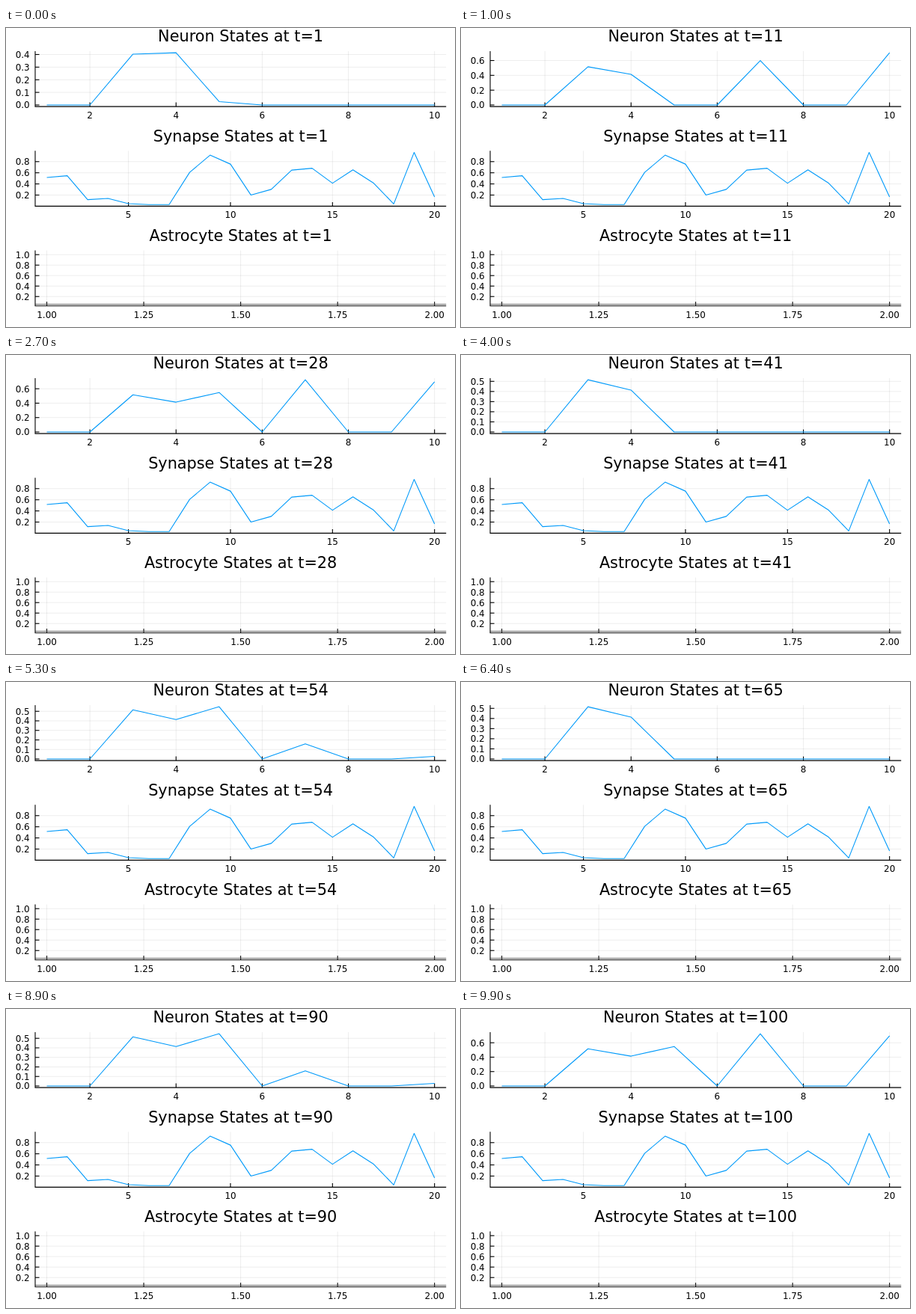
An HTML page that plays this animation: 600x400 px, repeating every 10 s.

```html
<!DOCTYPE html>
<html lang="en">
<head>
<meta charset="utf-8">
<title>Network states</title>
<style>
  html, body { margin: 0; width: 600px; height: 400px; overflow: hidden; background: #fff; }
  svg { display: block; }
  text { font-family: "DejaVu Sans", sans-serif; font-size: 11.9px; fill: #000; }
  .title { font-size: 20.8px; text-anchor: middle; }
  .x { text-anchor: middle; }
  .y { text-anchor: end; }
  .grid { stroke: #000; stroke-opacity: .1; stroke-width: .7; }
  .axis { stroke: #000; stroke-width: 1.1; fill: none; }
  .curve { stroke: #009afa; stroke-width: 1.1; fill: none; stroke-linejoin: round; }
  .level { stroke: #555; stroke-width: .9; }
</style>
</head>
<body>
<svg id="stage" width="600" height="400" viewBox="0 0 600 400"></svg>
<script>
const LEFT = 39, RIGHT = 588.2, HEIGHT = 74.1, PAD = 0.03 / 1.06;
const STEP_MS = 100, STEPS = 100;

const first = [0, 0, .403, .414, .027, 0, 0, 0, 0, 0];
// The network settles into a cycle of four steps.
const cycle = [
  [0, 0, .516, .414, .548, 0, .725, 0, 0, .697],
  [0, 0, .516, .414, 0, 0, 0, 0, 0, 0],
  [0, 0, .516, .414, .548, 0, .159, 0, 0, .028],
  [0, 0, .516, .414, 0, 0, .6, 0, 0, .705]
];
const synapses = [.516, .547, .118, .139, .045, .028, .031, .607, .917, .755,
  .201, .302, .648, .681, .413, .652, .419, .041, .966, .165];

const svg = document.getElementById("stage");

function add(parent, tag, attrs, text) {
  const el = document.createElementNS("http://www.w3.org/2000/svg", tag);
  for (const key in attrs) el.setAttribute(key, attrs[key]);
  if (text !== undefined) el.textContent = text;
  parent.appendChild(el);
  return el;
}

const path = (parent, cls, d) => add(parent, "path", { class: cls, d });

const range = (from, to, step) => {
  const list = [];
  for (let i = 0; from + i * step <= to + 1e-9; i++) list.push(from + i * step);
  return list;
};

function scale(lo, hi, a, b) {
  const pad = (b - a) * PAD;
  return v => a + pad + (v - lo) / (hi - lo) * (b - a - 2 * pad);
}

function makePanel(row, name, xMin, xMax, xTicks, digits) {
  const top = 31 + row * 133.3, bottom = top + HEIGHT;
  const x = scale(xMin, xMax, LEFT, RIGHT);
  const g = add(svg, "g", {});
  const title = add(g, "text", { class: "title", x: 313.6, y: top - 12.7 });
  for (const v of xTicks) {
    path(g, "grid", `M${x(v)} ${bottom}V${top}`);
    path(g, "axis", `M${x(v)} ${bottom}v-5.5`);
    add(g, "text", { class: "x", x: x(v), y: bottom + 15.8 }, v.toFixed(digits));
  }
  const body = add(g, "g", {});
  path(g, "axis", `M${LEFT} ${top}V${bottom}H${RIGHT}`);

  return {
    body,
    setTime(t) { title.textContent = `${name} States at t=${t}`; },
    draw(lo, hi, yTicks, values) {
      const y = scale(lo, hi, bottom, top);
      body.replaceChildren();
      for (const v of yTicks) {
        path(body, "grid", `M${LEFT} ${y(v)}H${RIGHT}`);
        path(body, "axis", `M${LEFT} ${y(v)}h5.5`);
        add(body, "text", { class: "y", x: 31.7, y: y(v) + 4.4 }, v.toFixed(1));
      }
      if (values) path(body, "curve", "M" + values.map((v, i) => `${x(i + 1)} ${y(v)}`).join("L"));
      return y;
    }
  };
}

const neuron = makePanel(0, "Neuron", 1, 10, range(2, 10, 2), 0);
const synapse = makePanel(1, "Synapse", 1, 20, range(5, 20, 5), 0);
const astrocyte = makePanel(2, "Astrocyte", 1, 2, range(1, 2, .25), 2);
const panels = [neuron, synapse, astrocyte];

synapse.draw(.028, .966, range(.2, .8, .2), synapses);
const level = astrocyte.draw(.052, 1.05, range(.2, 1, .2))(.052);
path(astrocyte.body, "level", `M${LEFT} ${level}H${RIGHT}`);

let shown = 0;
function frame() {
  const t = Math.floor(performance.now() / STEP_MS) % STEPS + 1;
  if (t !== shown) {
    shown = t;
    const values = t === 1 ? first : cycle[t % 4];
    const max = Math.max(...values);
    neuron.draw(0, max, range(0, max, max > .6 ? .2 : .1), values);
    panels.forEach(p => p.setTime(t));
  }
  requestAnimationFrame(frame);
}
frame();
</script>
</body>
</html>
```
